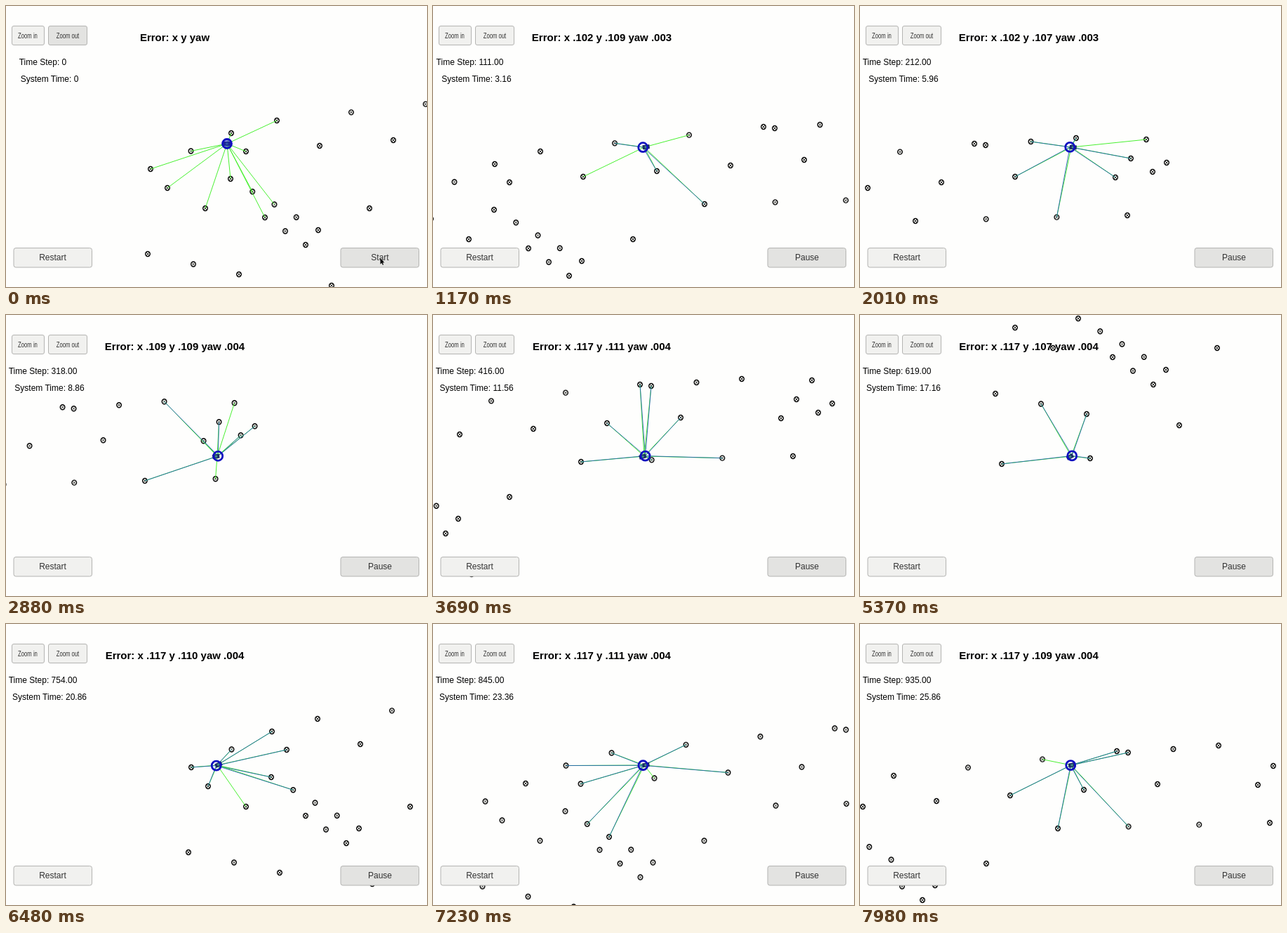
These frames come from a looping animation (600 px wide and 400 px high, 8 s). An HTML page with a canvas:

```html
<!DOCTYPE html>
<html lang="en">
<head>
<meta charset="utf-8">
<title>Localization simulator</title>
<style>
  html, body { margin: 0; width: 100%; height: 100%; overflow: hidden; background: #fefefd; }
  canvas, svg { position: absolute; left: 0; top: 0; width: 600px; height: 400px; }
  text { font-family: "Liberation Sans", Arial, sans-serif; font-size: 12px; text-anchor: middle; fill: #000; }
  .error { font-size: 15px; font-weight: bold; }
  .button rect { fill: #f1f1ef; stroke: #b4b4b2; }
  .button text { fill: #323232; }
  .button .narrow { font-size: 11px; }
  .button.hover rect { fill: #e3e3e1; }
</style>
</head>
<body>
<canvas id="map" width="600" height="400"></canvas>
<svg viewBox="0 0 600 400">
  <g class="button">
    <rect x="8.5" y="28.5" width="46" height="27" rx="2.5"/>
    <text class="narrow" transform="translate(31 46.2) scale(.7 1)">Zoom in</text>
  </g>
  <g class="button" id="zoomOut">
    <rect x="60.5" y="28.5" width="55" height="27" rx="2.5"/>
    <text class="narrow" transform="translate(88 46.2) scale(.7 1)">Zoom out</text>
  </g>
  <g class="button">
    <rect x="11" y="344.5" width="111.5" height="27.5" rx="3"/>
    <text x="66.5" y="362.3">Restart</text>
  </g>
  <g class="button hover">
    <rect x="477" y="344.5" width="111.5" height="27.5" rx="3"/>
    <text id="toggle" x="533" y="362.3">Start</text>
  </g>
  <text class="error" id="error" x="240.5" y="50"></text>
  <text id="step" x="52.5" y="83.7"></text>
  <text id="clock" x="62" y="107.7"></text>
  <path id="cursor" d="M533.5 359v8.5l2-1.8 1.4 3 1.2-.6-1.4-2.8h2.6z"/>
</svg>
<script>
const LOOP = 8000, FRAME = 30, START = 225, RANGE = 120.5;
const CENTER = [301, 201];
const $ = id => document.getElementById(id);
const ctx = $('map').getContext('2d');

// A row of evenly spaced landmarks
function row(x1, y1, x2, y2, count = 2) {
  return Array.from({ length: count }, (_, i) => {
    const u = i / (count - 1);
    return [x1 + (x2 - x1) * u, y1 + (y2 - y1) * u];
  });
}

const landmarks = [
  // north side of the road, then its south side
  row(206, 232, 321, 181, 3), row(386, 163, 704, 128, 4), row(720, 130, 849, 120, 3),
  row(342, 207, 762, 175, 5),
  // turning place and way back
  row(905, 176, 949, 122, 3), row(958, 168, 978, 155), row(620, 238, 922, 230, 4),
  row(518, 288, 464, 398), row(320, 246, 445, 319, 5), row(369, 301, 427, 340, 3),
  // south-west bend
  row(230, 259, 284, 288), row(202, 353, 332, 382, 3), row(211, 453, 337, 445)
].flat();

// Vehicle route: time, x, y
const route = [
  [START, 315, 196], [1170, 534, 157], [2010, 842, 133], [2600, 965, 185],
  [3690, 710, 230], [4860, 398, 338], [5370, 310, 442], [5720, 228, 425],
  [6100, 228, 330], [6480, 243, 229], [7980, 639, 148]
];

const clamp = u => Math.min(1, Math.max(0, u));

function slope(i, k) {
  const a = route[Math.max(0, i - 1)], b = route[Math.min(route.length - 1, i + 1)];
  return (b[k] - a[k]) / (b[0] - a[0]);
}

// Smooth curve through the route points
function position(t) {
  let i = 0;
  while (i < route.length - 2 && t >= route[i + 1][0]) i++;
  const a = route[i], b = route[i + 1], span = b[0] - a[0];
  const u = clamp((t - a[0]) / span), u2 = u * u, u3 = u2 * u;
  return [1, 2].map(k =>
    (2 * u3 - 3 * u2 + 1) * a[k] + (3 * u2 - 2 * u3) * b[k] +
    span * ((u3 - 2 * u2 + u) * slope(i, k) + (u3 - u2) * slope(i + 1, k)));
}

function line(from, to, color) {
  ctx.strokeStyle = color;
  ctx.lineWidth = 1;
  ctx.beginPath();
  ctx.moveTo(...from);
  ctx.lineTo(...to);
  ctx.stroke();
}

function drawLandmark([x, y]) {
  ctx.strokeStyle = '#000';
  ctx.fillStyle = '#f4f4f0';
  ctx.lineWidth = 1.4;
  ctx.beginPath();
  ctx.ellipse(x, y, 3.3, 3.5, 0, 0, 2 * Math.PI);
  ctx.fill();
  ctx.stroke();
  line([x - 2, y - 2], [x + 2, y + 2], '#333');
  line([x + 2, y - 2], [x - 2, y + 2], '#333');
}

function drawVehicle(car, ring, angle, running) {
  ctx.save();
  ctx.translate(...car);
  ctx.rotate(angle);
  ctx.fillStyle = '#1c2a66';
  ctx.fillRect(-5, -3, 10, 6);
  ctx.fillStyle = '#3c8a86';
  ctx.fillRect(-2, -1.5, 3.5, 3);
  ctx.restore();
  ctx.beginPath();
  ctx.arc(...ring, 6.5, 0, 2 * Math.PI);
  if (!running) {
    ctx.fillStyle = 'rgba(30,30,200,.5)';
    ctx.fill();
  }
  ctx.strokeStyle = '#1010c0';
  ctx.lineWidth = 2.8;
  ctx.stroke();
}

function drawMap(t, running) {
  const here = position(t);
  const ahead = position(t + 5), behind = position(t - 5);
  const speed = here.map((_, k) => (ahead[k] - behind[k]) / 10);
  const center = running ? CENTER : here;
  const shifted = ms => center.map((v, k) => v + (running ? speed[k] * ms : 0));
  const car = shifted(9), ring = shifted(-6);

  ctx.clearRect(0, 0, 600, 400);
  const points = landmarks.map(p => p.map((v, k) => v - here[k] + center[k]));
  points.forEach(drawLandmark);
  points.forEach((p, i) => {
    if (Math.hypot(p[0] - center[0], p[1] - center[1]) > RANGE) return;
    line(center, p, '#48f030');
    if (running && i % 6 !== 5) line(ring, p, 'rgba(36,96,176,.9)');
  });
  drawVehicle(car, ring, Math.atan2(speed[1], speed[0]), running);
}

function drawLabels(t, running) {
  const step = Math.max(0, Math.round((t - 256) * .1211));
  const seconds = Math.max(0, t / 300 - .74);
  const u = clamp((t - 2010) / 1680);
  const drift = u * u * (3 - 2 * u);
  const wave = Math.cos((t - 2010) / 3360 * 2 * Math.PI);
  const errors = [.1015 + .015 * drift, .1092 - .002 * wave, .003 + .001 * drift];
  const [x, y, yaw] = errors.map(e => e.toFixed(3).slice(1));
  $('error').textContent = running ? `Error: x ${x} y ${y} yaw ${yaw}` : 'Error: x y yaw';
  $('step').textContent = 'Time Step: ' + (running ? step.toFixed(2) : 0);
  $('clock').textContent = 'System Time: ' + (running ? seconds.toFixed(2) : 0);
  $('toggle').textContent = running ? 'Pause' : 'Start';
  $('zoomOut').classList.toggle('hover', !running);
  $('cursor').style.visibility = t < 450 ? 'visible' : 'hidden';
}

function render(now) {
  const t = Math.floor((now % LOOP) / FRAME) * FRAME;
  const running = t > START;
  drawMap(t, running);
  drawLabels(t, running);
}

const origin = performance.now();
function tick() {
  render(performance.now() - origin);
  requestAnimationFrame(tick);
}
tick();
</script>
</body>
</html>
```
